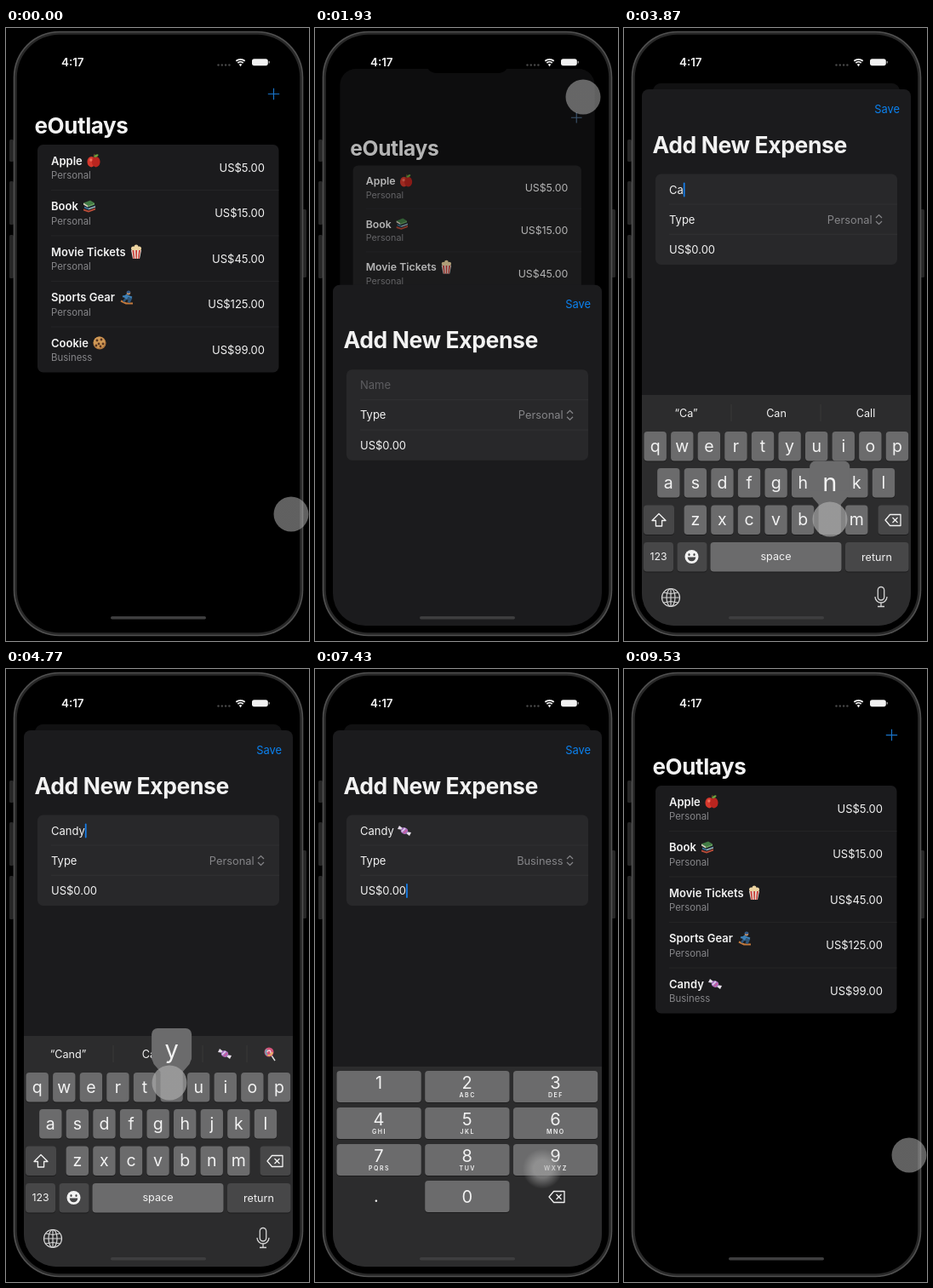
An HTML page with a canvas that plays this animation: 356x720 px, repeating every 9560 ms.

```html
<!DOCTYPE html>
<html lang="en">
<head>
<meta charset="utf-8">
<title>Expense list</title>
<style>
html, body { margin: 0; width: 100%; height: 100%; overflow: hidden; background: #000; }
canvas { display: block; width: 356px; height: 720px; }
</style>
</head>
<body>
<canvas id="stage"></canvas>
<script>
const LOOP = 9560;
const canvas = document.getElementById('stage');
const c = canvas.getContext('2d');
const dpr = window.devicePixelRatio || 1;
canvas.width = 356 * dpr;
canvas.height = 720 * dpr;

const WHITE = '#f2f2f2', GREY = '#858588', BLUE = '#0b80ee';
const KEY = '#6b6b6c', DARK_KEY = '#474748';
const SCREEN = { x: 21, y: 17, w: 316, h: 685, r: 38 };

// ---------- timeline ----------
const SHEET_OPEN = 1738, KEYBOARD_OPEN = 2620, MENU_OPEN = 6100, MENU_CLOSE = 6510;
const PAD_SWAP = 7050, SAVED = 8700, EMOJI_TAP = 5300;
const LETTER_TAPS = [3090, 3490, 3900, 4320, 4750];
const ERASE_TAPS = [7560, 7640, 7720, 7800];
const NINE_TAPS = [8060, 8200];
const TAPS = [1640, 2590, ...LETTER_TAPS, EMOJI_TAP, 6080, 6500, 7010, ...ERASE_TAPS, ...NINE_TAPS, 8660];
const REST = [335, 571];
// leave time, arrival time, x, y
const MOVES = [
  [60, 400, 290, 378], [430, 800, 75, 378], [1080, 1560, 315, 81],
  [2200, 2540, 149, 190], [2640, 3040, 149, 577], [3160, 3440, 52, 534],
  [3570, 3850, 242, 577], [3980, 4270, 115, 534], [4390, 4690, 192, 486],
  [4900, 5240, 257, 452], [5620, 6040, 281, 225], [6180, 6450, 215, 262],
  [6620, 6950, 100, 260], [7130, 7500, 284, 620], [7880, 8010, 284, 577],
  [8300, 8620, 309, 95], [8860, 9330, ...REST]
];

const clamp = v => Math.min(1, Math.max(0, v));
const mix = (a, b, k) => a + (b - a) * k;
const ramp = (t, a, b) => { const u = clamp((t - a) / (b - a)); return u * u * (3 - 2 * u); };
const spring = (ms, speed) => { const u = Math.max(0, ms) / 1000 * speed; return 1 - (1 + u) * Math.exp(-u); };
const countUntil = (times, t) => times.filter(v => v <= t).length;
const coolGray = v => `rgb(${v},${v},${v * 1.06})`;

function touchAt(t) {
  let [x, y] = REST;
  for (const [leave, arrive, tx, ty] of MOVES) {
    if (t < leave) break;
    const k = ramp(t, leave, arrive);
    x = mix(x, tx, k);
    y = mix(y, ty, k);
  }
  return { x, y };
}

// ---------- drawing helpers ----------
function text(str, x, cy, size, { color = WHITE, weight = 400, align = 'left', spacing = 0 } = {}) {
  c.font = `${weight} ${size}px Inter, Roboto, sans-serif`;
  c.letterSpacing = spacing + 'px';
  c.textAlign = align;
  c.fillStyle = color;
  c.fillText(str, x, cy + size * 0.36);
  return c.measureText(str).width;
}
function box(x, y, w, h, r, color) {
  c.beginPath();
  c.roundRect(x, y, w, h, r);
  if (color) { c.fillStyle = color; c.fill(); }
}
function dot(x, y, r, color, ry = r, turn = 0) {
  c.beginPath();
  c.ellipse(x, y, r, ry, turn, 0, 7);
  c.fillStyle = color;
  c.fill();
}
function trace(points, close) {
  c.beginPath();
  points.forEach(([x, y]) => c.lineTo(x, y));
  if (close) c.closePath();
}
function shape(color, ...points) { trace(points, true); c.fillStyle = color; c.fill(); }
function line(color, width, ...points) { trace(points); c.strokeStyle = color; c.lineWidth = width; c.stroke(); }
function arc(x, y, r, from, to, color, width) {
  c.beginPath();
  c.arc(x, y, r, from, to);
  c.strokeStyle = color;
  c.lineWidth = width;
  c.stroke();
}
function group(draw) { c.save(); draw(); c.restore(); }

// Small pictures in a 16 x 16 cell around the origin
const PICTURES = {
  apple() {
    dot(-2.7, 1.2, 4.8, '#d5382d', 6.2);
    dot(2.7, 1.2, 4.8, '#b9251f', 6.2);
    dot(-3.2, -1, 1.7, '#f0705b');
    line('#70452a', 1.2, [0, -4], [1, -8]);
    dot(3, -6, 2.8, '#69a13e', 1.3, -0.5);
  },
  books() {
    shape('#427c45', [-7, -4], [1, -7], [6, -4], [-2, -1]);
    shape('#d9d5c0', [-7, -4], [-2, -1], [-2, 1], [-7, -2]);
    shape('#63a05f', [-2, -1], [6, -4], [6, -2], [-2, 1]);
    shape('#3a7197', [-6, 0], [-1, 2], [7, -1], [7, 1], [-1, 4], [-6, 2]);
    shape('#b74b38', [-7, 3], [-1, 5], [7, 2], [7, 4], [-1, 7], [-7, 5]);
    line('#e7dfc6', 0.8, [-1, 3], [7, 0.5]);
  },
  popcorn() {
    [[-3.5, -4], [0, -6], [3.5, -4], [-1.5, -3], [2, -2.5]].forEach(([x, y]) => dot(x, y, 2.5, '#ecd3a0'));
    shape('#e6ddd5', [-6, -2], [6, -2], [4, 8], [-4, 8]);
    for (const x of [-4.6, -0.8, 3]) shape('#c83a32', [x, -2], [x + 1.9, -2], [x * 0.7 + 1.3, 8], [x * 0.7, 8]);
  },
  boarder() {
    line('#c57a3c', 2.2, [-7, 4], [-1, 7], [7, 7]);
    line('#2f5578', 3.2, [-1, 1], [4, 2], [2, 6]);
    line('#2f5578', 2.6, [-1, 1], [-4, 5]);
    line('#3d7fb5', 4, [1, -3], [-2, 1]);
    line('#3d7fb5', 2, [0, -2], [6, 0]);
    line('#3d7fb5', 2, [0, -2], [-5, -1]);
    dot(2, -5.4, 2.3, '#d99c6a');
    dot(2, -6.4, 2.3, '#315b8d', 1.6);
  },
  cookie() {
    dot(0, 0, 7.6, '#ad753e');
    dot(-0.5, -0.7, 6.7, '#cf9855');
    [[-3, -3], [2, -4], [4, 1], [-1, 1], [-4, 3], [1, 4]].forEach(([x, y]) => dot(x, y, 1.4, '#593520'));
  },
  candy() {
    shape('#e3dbe8', [-2, -1], [-8, -2], [-7, -4], [-6, -6], [-2, -3]);
    shape('#e9e2ec', [2, 1], [8, 2], [7, 4], [6, 6], [2, 3]);
    dot(0, 0, 4.2, '#a573c1', 3.7, 0.5);
    line('#ead5ee', 1.4, [-3, 1], [1, -3]);
    line('#cf5799', 1.4, [-1, 3], [3, -1]);
  },
  lollipop() {
    line('#ddd', 1.4, [2, 2], [6, 8]);
    dot(-1, -2, 5.5, '#d5547a');
    arc(-1, -2, 3.8, 0, 2, '#edc45c', 1.6);
    arc(-1, -2, 3.8, 2.1, 4.1, '#60b3bd', 1.6);
    arc(-1, -2, 2, 3, 7, '#f3dddd', 1.3);
  }
};
function picture(name, x, y) {
  group(() => { c.translate(x, y); PICTURES[name](); });
}

// ---------- phone ----------
function phoneBody() {
  for (const [x, y, h] of [[4, 131, 26], [4, 180, 51], [4, 243, 51], [348, 213, 80]]) box(x, y, 5, h, 1.5, '#272727');
  box(8.7, 3.7, 340.6, 710.6, 54, '#505050');
  box(10.3, 5.3, 337.4, 707.4, 52.5, '#282828');
  box(12.8, 7.8, 332.4, 702.4, 50, '#000');
}
function statusBar() {
  box(130, 16, 98, 37, [0, 0, 13, 13], '#000');
  text('4:17', 65, 40.5, 13.4, { weight: 600 });
  for (let i = 0; i < 4; i++) dot(249.5 + i * 4.3, 43.5, 1.2, '#484848');
  arc(275.5, 44.6, 7.8, -2.3, -0.84, WHITE, 1.8);
  arc(275.5, 44.6, 4.8, -2.3, -0.84, WHITE, 1.8);
  c.beginPath();
  c.moveTo(275.5, 45.2);
  c.arc(275.5, 44.6, 2.5, -2.35, -0.79);
  c.fillStyle = WHITE;
  c.fill();
  box(289, 36.2, 18.8, 8, 2.6, WHITE);
  box(308.6, 38.8, 1.3, 2.8, 0.6, '#999');
}

// ---------- expense list ----------
const ROW = 53.5, LIST_TOP = 137;
const ITEMS = [
  ['Apple', 'apple', 103, 'Personal', '5.00'],
  ['Book', 'books', 98, 'Personal', '15.00'],
  ['Movie Tickets', 'popcorn', 153, 'Personal', '45.00'],
  ['Sports Gear', 'boarder', 142, 'Personal', '125.00']
];
const COOKIE = ['Cookie', 'cookie', 110, 'Business', '99.00'];
const CANDY = ['Candy', 'candy', 107, 'Business', '99.00'];

function expenseRow([name, icon, iconX, type, amount], y) {
  text(name, 53, y + 19, 13, { weight: 600 });
  picture(icon, iconX, y + 19);
  text(type, 53, y + 36, 11.4, { color: GREY });
  text('US$' + amount, 304, y + 27, 13, { align: 'right' });
}
function expenseList(t, lift) {
  // The tint fades to grey while the sheet covers the list
  const tint = `rgb(${mix(25, 110, lift)},${mix(115, 112, lift)},${mix(200, 116, lift)})`;
  line(tint, 1.2, [307.8, 77.5], [321.2, 77.5]);
  line(tint, 1.2, [314.5, 70.8], [314.5, 84.2]);
  text('eOutlays', 33.5, 115, 26, { weight: 700, spacing: -0.4 });

  const last = t < SAVED ? COOKIE : CANDY;
  const extra = t < SAVED ? 1 - ramp(t, 950, 1150) : 1;
  const swipe = t < SAVED ? mix(-215 * ramp(t, 430, 800), -283, ramp(t, 810, 950)) : 0;
  group(() => {
    box(37, LIST_TOP, 283.5, ROW * (4 + extra), 6.5, coolGray(mix(27, 41, lift)));
    c.clip();
    ITEMS.forEach((item, i) => {
      const y = LIST_TOP + i * ROW;
      expenseRow(item, y);
      if (i < 3 || extra > 0) line(coolGray(mix(39, 52, lift)), 0.8, [53, y + ROW], [321, y + ROW]);
    });
    if (extra <= 0) return;
    const y = LIST_TOP + 4 * ROW;
    if (swipe < 0) {
      box(320.5 + swipe, y, -swipe, ROW, 0, '#f4433a');
      text('Delete', 320.5 + swipe + Math.min(35, -swipe / 2), y + 27, 13, { align: 'center' });
    }
    group(() => {
      c.beginPath();
      c.rect(37, y, 283.5 + swipe, ROW);
      c.clip();
      c.translate(swipe, 0);
      expenseRow(last, y);
    });
  });
}
function listCard(t, lift) {
  group(() => {
    const scale = 1 - 0.083 * lift;
    c.translate(179, SCREEN.y + 48 * lift);
    c.scale(scale, scale);
    c.translate(-179, -SCREEN.y);
    box(SCREEN.x, SCREEN.y, SCREEN.w, SCREEN.h, mix(SCREEN.r, 10, lift), coolGray(28 * lift));
    c.clip();
    expenseList(t, lift);
    box(SCREEN.x, SCREEN.y, SCREEN.w, SCREEN.h, 0, `rgba(0,0,0,${0.4 * lift})`);
  });
}

// ---------- new expense form ----------
function caret(x, y) { box(x, y - 8.5, 1.8, 17, 0.9, '#167de8'); }

function form(t) {
  box(21, 72, 316, 720, 8, '#1b1b1d');
  text('Save', 324, 95, 12.9, { color: BLUE, align: 'right' });
  text('Add New Expense', 33.5, 137, 26.5, { weight: 700, spacing: -0.4 });
  box(37, 171.5, 284, 106.5, 6.5, '#28282a');
  for (const y of [207, 242.3]) line('#343436', 0.8, [53, y], [321, y]);

  const letters = countUntil(LETTER_TAPS, t);
  const name = 'Candy'.slice(0, letters);
  const width = text(name || 'Name', 53, 190, 13, { color: name ? WHITE : '#5d5d60' });
  if (t >= EMOJI_TAP) picture('candy', 105, 190);
  if (t > KEYBOARD_OPEN && t < PAD_SWAP) caret(t >= EMOJI_TAP ? 117 : 53 + (name ? width : 0), 190);

  text('Type', 53, 225, 13);
  text(t < MENU_CLOSE ? 'Personal' : 'Business', 291.5, 225, 12.8, { color: GREY, align: 'right' });
  line(GREY, 1.2, [296, 223], [299.5, 219.5], [303, 223]);
  line(GREY, 1.2, [296, 227], [299.5, 230.5], [303, 227]);

  const erased = countUntil(ERASE_TAPS, t), nines = countUntil(NINE_TAPS, t);
  const amount = 'US$' + '0.00'.slice(0, 4 - erased) + '9'.repeat(nines);
  const amountWidth = text(amount, 53, 260.5, 13);
  if (t > PAD_SWAP && t < SAVED) caret(53 + amountWidth, 260.5);
}
function typeMenu(t) {
  const open = spring(t - MENU_OPEN, 26) * (1 - ramp(t, MENU_CLOSE, MENU_CLOSE + 170));
  if (open < 0.01) return;
  group(() => {
    c.globalAlpha = open;
    c.translate(300, 236);
    c.scale(mix(0.3, 1, open), mix(0.3, 1, open));
    c.translate(-300, -236);
    box(112, 243, 202, 72, 10, '#303032');
    line('#444446', 0.8, [112, 279], [314, 279]);
    text('Business', 139, 261, 13);
    text('Personal', 139, 297, 13);
    line(WHITE, 1.5, [121, 297], [124, 301], [130, 292]);
  });
}

// ---------- keyboards ----------
const LETTER_ROWS = [['qwertyuiop', 36.7, 474], ['asdfghjkl', 52.3, 517], ['zxcvbnm', 83.8, 560.5]];
const SUGGESTIONS = [
  ['I', 'The', 'I’m'], ['“C”', 'Can', 'Could'], ['“Ca”', 'Can', 'Call'],
  ['“Can”', 'Can’t', 'Cancel'], ['“Cand”', 'Candy'], ['“Candy”', 'Candle'], ['is', 'Crush', 'and']
];

function key(x, y, w, color = KEY, h = 34.5) {
  box(x, y + 1, w, h, 4, '#1c1c1d');
  box(x, y, w, h, 4, color);
}
function eraseIcon(x, y) {
  c.lineJoin = 'round';
  trace([[x - 9, y], [x - 3.5, y - 6.5], [x + 9, y - 6.5], [x + 9, y + 6.5], [x - 3.5, y + 6.5]], true);
  c.strokeStyle = WHITE;
  c.lineWidth = 1.3;
  c.stroke();
  line(WHITE, 1.3, [x - 0.5, y - 3], [x + 5.5, y + 3]);
  line(WHITE, 1.3, [x - 0.5, y + 3], [x + 5.5, y - 3]);
}
function globe(x, y) {
  arc(x, y, 10.5, 0, 7, '#d5d5d5', 1.2);
  c.beginPath();
  c.ellipse(x, y, 5, 10.5, 0, 0, 7);
  c.stroke();
  line('#d5d5d5', 1.2, [x, y - 10.5], [x, y + 10.5]);
  line('#d5d5d5', 1.2, [x - 10.5, y], [x + 10.5, y]);
  for (const side of [-1, 1]) line('#d5d5d5', 1.1, [x - 8.5, y + 6 * side], [x, y + 4.5 * side], [x + 8.5, y + 6 * side]);
}
function microphone(x, y) {
  c.strokeStyle = '#d5d5d5';
  c.lineWidth = 1.3;
  box(x - 3.7, y - 11.5, 7.4, 15.5, 3.7);
  c.stroke();
  arc(x, y, 7, 0, Math.PI, '#d5d5d5', 1.3);
  line('#d5d5d5', 1.3, [x, y + 7], [x, y + 11.5]);
  line('#d5d5d5', 1.3, [x - 4, y + 11.5], [x + 4, y + 11.5]);
}
function suggestions(t) {
  const step = t >= EMOJI_TAP ? 6 : countUntil(LETTER_TAPS, t - 90);
  SUGGESTIONS[step].forEach((word, i) => text(word, [73, 179, 284][i], 452, 12.6, { align: 'center' }));
  for (const x of [126, 231]) line('#3b3b3c', 0.9, [x, 442], [x, 462]);
  if (step === 4 || step === 5) {
    picture('candy', 257, 452);
    picture('lollipop', 310, 452);
    line('#3b3b3c', 0.9, [283, 442], [283, 462]);
  }
}
function keyBubble(letter, x, y) {
  box(x - 23.5, y - 52, 47, 41, 7, KEY);
  shape(KEY, [x - 23.5, y - 17], [x + 23.5, y - 17], [x + 21, y - 10], [x + 13.2, y - 1], [x + 13.2, y + 2], [x - 13.2, y + 2], [x - 13.2, y - 1], [x - 21, y - 10]);
  text(letter, x, y - 27, 29, { align: 'center' });
}
function letterKeyboard(t) {
  suggestions(t);
  const upper = t < LETTER_TAPS[0] + 70;
  const pressedIndex = LETTER_TAPS.findIndex(tap => t > tap - 60 && t < tap + 70);
  const pressed = 'candy'[pressedIndex];
  let bubble;
  for (const [letters, firstX, y] of LETTER_ROWS) {
    [...letters].forEach((letter, i) => {
      const x = firstX + i * 31.58, label = upper ? letter.toUpperCase() : letter;
      key(x - 13.2, y, 26.4);
      if (letter === pressed) bubble = [label, x, y];
      else text(label, x, y + (upper ? 17.5 : 16.5), upper ? 18 : 19.5, { align: 'center' });
    });
  }
  key(23, 560.5, 36, upper ? '#dadada' : DARK_KEY);
  trace([[41, 570.5], [49, 578.5], [44.6, 578.5], [44.6, 585], [37.4, 585], [37.4, 578.5], [33, 578.5]], true);
  c.fillStyle = '#000';
  c.strokeStyle = WHITE;
  c.lineWidth = 1.3;
  c.lineJoin = 'round';
  upper ? c.fill() : c.stroke();
  key(298.5, 560.5, 36, DARK_KEY);
  eraseIcon(316, 578);

  key(23, 604, 35, DARK_KEY);
  key(62.5, 604, 35, DARK_KEY);
  key(101.5, 604, 154);
  key(260, 604, 74.5, DARK_KEY);
  text('123', 40.5, 621, 12.3, { align: 'center' });
  text('space', 178.5, 620.5, 12.6, { align: 'center' });
  text('return', 297, 621, 12.6, { align: 'center' });
  dot(79.5, 621, 8, WHITE);
  dot(76.5, 618.5, 1.1, DARK_KEY, 1.6);
  dot(82.5, 618.5, 1.1, DARK_KEY, 1.6);
  c.beginPath();
  c.arc(79.5, 621.5, 4.8, 0, Math.PI);
  c.fillStyle = DARK_KEY;
  c.fill();
  globe(55, 669);
  microphone(302, 668);
  if (bubble) keyBubble(...bubble);
}
function numberPad() {
  const letters = ['', 'ABC', 'DEF', 'GHI', 'JKL', 'MNO', 'PQRS', 'TUV', 'WXYZ'];
  letters.forEach((label, i) => {
    const x = 25.5 + i % 3 * 103.7, y = 472 + Math.floor(i / 3) * 43;
    key(x, y, 99.3, KEY, 37);
    text(String(i + 1), x + 49.5, y + 13.5, 20, { align: 'center' });
    text(label, x + 50, y + 28.5, 7, { weight: 600, align: 'center', spacing: 1.5 });
  });
  key(129.2, 601, 99.3, KEY, 37);
  text('0', 178.7, 620, 20, { align: 'center' });
  text('.', 72, 619, 20, { align: 'center' });
  eraseIcon(284, 620);
}
function keyboard(t) {
  const shown = t < SAVED ? spring(t - KEYBOARD_OPEN, 20) : 1 - spring(t - SAVED, 13);
  if (shown < 0.002) return;
  group(() => {
    c.translate(0, (1 - shown) * 290);
    const top = mix(431, 467, ramp(t, PAD_SWAP, PAD_SWAP + 200));
    box(21, top, 316, 300, 0, '#2c2c2d');
    t < PAD_SWAP + 80 ? letterKeyboard(t) : numberPad();
  });
}

// ---------- touch marker ----------
function touchMarker(t) {
  const { x, y } = touchAt(t), before = touchAt(Math.max(0, t - 16));
  const soft = Math.min(6, Math.hypot(x - before.x, y - before.y) * 0.4);
  const down = TAPS.some(tap => Math.abs(t - tap) < 80) || (t > 410 && t < 820);
  const alpha = down ? 0.68 : 0.56, radius = 20.5 + soft / 2;
  const fill = c.createRadialGradient(x, y, Math.max(0, 19.5 - soft * 1.5), x, y, radius);
  fill.addColorStop(0, `rgba(172,172,172,${alpha})`);
  fill.addColorStop(1, `rgba(172,172,172,${soft > 0.2 ? 0 : alpha})`);
  dot(x, y, radius, fill);
}

function draw(t) {
  c.setTransform(dpr, 0, 0, dpr, 0, 0);
  c.fillStyle = '#000';
  c.fillRect(0, 0, 356, 720);
  phoneBody();
  const lift = t < SAVED ? spring(t - SHEET_OPEN, 11.4) : 1 - spring(t - SAVED, 11.4);
  group(() => {
    box(SCREEN.x, SCREEN.y, SCREEN.w, SCREEN.h, SCREEN.r);
    c.clip();
    listCard(t, lift);
    if (lift > 0.002) {
      group(() => {
        c.translate(0, 648 * (1 - lift));
        form(t);
        typeMenu(t);
      });
      keyboard(t);
    }
    statusBar();
    box(123, 691, 112, 3.4, 1.7, '#3e3e3f');
  });
  touchMarker(t);
}

function frame() {
  draw(performance.now() % LOOP);
  requestAnimationFrame(frame);
}
frame();
</script>
</body>
</html>
```
